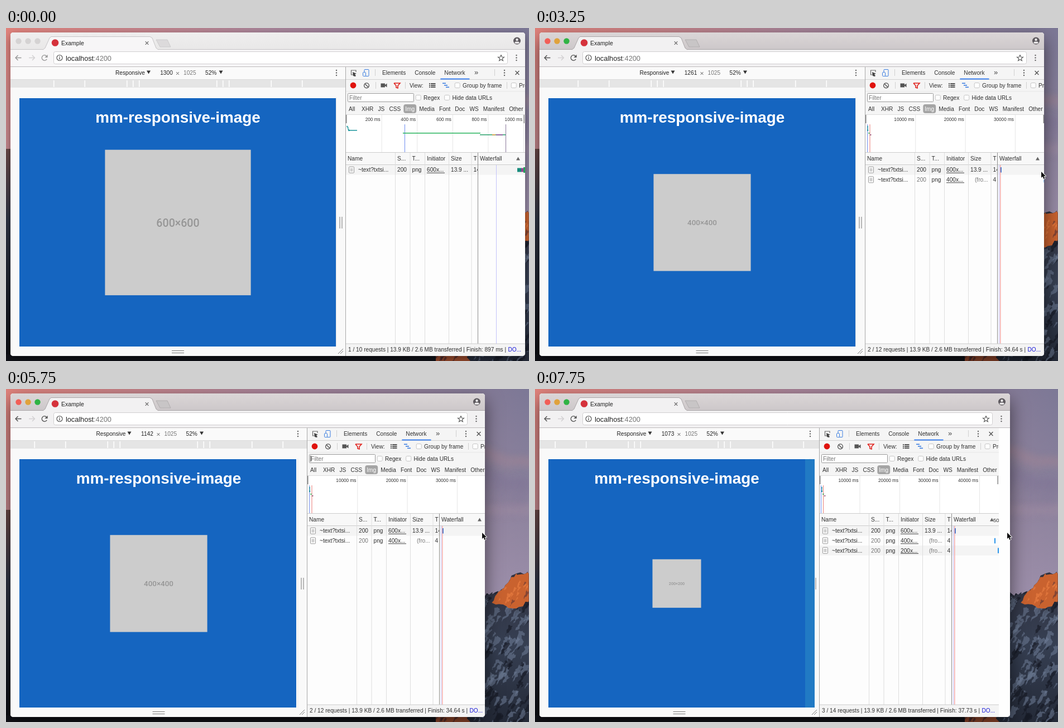
Write an HTML page with a canvas that moves like this. It is 937 px wide and 598 px high and loops after 8 s.

```html
<!DOCTYPE html>
<html lang="en">
<head>
<meta charset="utf-8">
<title>Responsive image demo</title>
<style>
html, body { margin: 0; width: 100%; height: 100%; overflow: hidden; background: #000; }
canvas { display: block; width: 937px; height: 598px; }
</style>
</head>
<body>
<canvas id="stage" width="937" height="598"></canvas>
<script>
const WIDE = 937, TALL = 598, LOOP = 8000, STEP = 250, TAU = Math.PI * 2;
const SCALE = 0.4354, PANEL = 321, TEXT = 10.15;
const SANS = '"Liberation Sans", Arial, sans-serif';
const INK = '#303030', GRAY = '#777', BLUE = '#3b7de0';
let ctx = document.getElementById('stage').getContext('2d');

// drag of the window edge: time, right edge, emulated viewport width
const DRAG = [
  { t: 2500, edge: 930, width: 1300 },
  { t: 3250, edge: 912, width: 1261 },
  { t: 3750, edge: 907, width: 1249 },
  { t: 4500, edge: 907, width: 1249 },
  { t: 4750, edge: 902, width: 1246 },
  { t: 5750, edge: 858, width: 1142 },
  { t: 6500, edge: 781, width: 984 },
  { t: 7000, edge: 773, width: 950 },
  { t: 7750, edge: 851, width: 1073 }
];
const NET = [
  { size: 600, requests: '1 / 10', finish: '897 ms', step: 63.6, unit: 200 },
  { size: 400, requests: '2 / 12', finish: '34.64 s', step: 89.3, unit: 10000 },
  { size: 200, requests: '3 / 14', finish: '37.73 s', step: 71.5, unit: 10000 }
];
// left edge of the text in each table column
const COLS = { 'Name': 3, 'S...': 92, 'T...': 118.5, 'Initiator': 145, 'Size': 188, 'T': 228.5, 'Waterfall': 240 };

function dragAt(t, field) {
  const i = DRAG.findIndex(k => k.t > t);
  if (i === 0) return DRAG[0][field];
  if (i < 0) return DRAG[DRAG.length - 1][field];
  const a = DRAG[i - 1], b = DRAG[i];
  return Math.round(a[field] + (b[field] - a[field]) * (t - a.t) / (b.t - a.t));
}

function rect(x, y, w, h, color) {
  ctx.fillStyle = color;
  ctx.fillRect(x, y, w, h);
}
function trace(points) {
  ctx.beginPath();
  points.forEach(p => ctx.lineTo(p[0], p[1]));
}
function poly(points, color) {
  trace(points);
  ctx.fillStyle = color;
  ctx.fill();
}
function stroke(points, color, width = 1) {
  trace(points);
  ctx.strokeStyle = color;
  ctx.lineWidth = width;
  ctx.stroke();
}
function dot(x, y, r, color) {
  ctx.beginPath();
  ctx.arc(x, y, r, 0, TAU);
  ctx.fillStyle = color;
  ctx.fill();
}
function arc(x, y, r, color, width = 1.2, from = 0, to = TAU) {
  ctx.beginPath();
  ctx.arc(x, y, r, from, to);
  ctx.strokeStyle = color;
  ctx.lineWidth = width;
  ctx.stroke();
}
function box(x, y, w, h, r, fill, edge) {
  ctx.beginPath();
  ctx.roundRect(x, y, w, h, r);
  if (fill) { ctx.fillStyle = fill; ctx.fill(); }
  if (edge) { ctx.strokeStyle = edge; ctx.lineWidth = 1; ctx.stroke(); }
}
// y is the middle of the capitals; returns the text width
function text(s, x, y, color = INK, size = TEXT, align = 'left', font = SANS, weight = '') {
  ctx.font = `${weight} ${size}px ${font}`;
  ctx.textAlign = align;
  ctx.fillStyle = color;
  ctx.fillText(s, x, y + size * 0.36);
  return ctx.measureText(s).width;
}
function flow(words, x, y, gap, chosen, mark) {
  for (const word of words) {
    ctx.font = `${TEXT}px ${SANS}`;
    if (word === chosen) mark(x, ctx.measureText(word).width);
    x += text(word, x, y, word === 'Img' ? '#fff' : INK) + gap;
  }
}
function clipped(x, y, w, h, r, paint) {
  ctx.save();
  ctx.beginPath();
  ctx.roundRect(x, y, w, h, r);
  ctx.clip();
  paint();
  ctx.restore();
}
function fade(x, y0, y1, ...colors) {
  const g = ctx.createLinearGradient(0, y0, x, y1);
  colors.forEach((c, i) => g.addColorStop(i / (colors.length - 1), c));
  return g;
}
const dots = (x, y) => [-4.5, 0, 4.5].forEach(d => dot(x, y + d, 1.2, '#666'));
const down = (x, y) => poly([[x - 3.5, y - 3], [x + 3.5, y - 3], [x, y + 3]], '#333');
const check = (x, y) => box(x - 4.5, y - 4.5, 9, 9, 2, '#fff', '#c4c4c4');
function cross(x, y, r, color, w) {
  stroke([[x - r, y - r], [x + r, y + r]], color, w);
  stroke([[x + r, y - r], [x - r, y + r]], color, w);
}

function makeWallpaper() {
  const page = document.createElement('canvas');
  page.width = WIDE;
  page.height = TALL;
  const main = ctx;
  ctx = page.getContext('2d');
  let seed = 11;
  const rnd = () => (seed = (seed * 16807) % 2147483647) / 2147483647;
  const spread = n => (rnd() - 0.5) * n;
  const jagged = (points, rough) => points.slice(1).flatMap((b, i) => {
    const a = points[i];
    return Array.from({ length: 7 }, (_, k) => [
      a[0] + (b[0] - a[0]) * k / 7 + spread(rough), a[1] + (b[1] - a[1]) * k / 7 + spread(rough)]);
  });
  const fleck = (x, y, n, color) =>
    poly(jagged([[x, y], [x + n * 0.5, y + n * 0.3], [x - n * 0.5, y + n * 1.4], [x, y]], n * 0.25), color);

  rect(0, 0, WIDE, TALL, fade(WIDE, 0, 0, '#e2837c', '#a9859a', '#7c7896'));
  rect(0, 0, WIDE, 400, fade(0, 0, 400, '#a391a800', '#a391a866', '#a394b0dd'));
  ctx.filter = 'blur(7px)';
  for (let x = 770; x < 950; x += 12) {
    const top = 122 - 20 * Math.exp(-(((x - 850) / 30) ** 2));
    fleck(x, top, 16, '#c3908f90');
    fleck(x, top + 36, 34, '#7d739460');
    fleck(x, 208, 16, '#b899a870');
  }
  ctx.filter = 'none';

  const slope = [[740, 290], [785, 320], [858, 369], [884, 364], [912, 332], [WIDE + 6, 330]];
  const ridge = jagged(slope, 5).concat([[WIDE, TALL], [740, TALL]]);
  poly(ridge, fade(0, 320, TALL, '#30313f', '#363f52', '#242a38'));
  ctx.save();
  trace(ridge);
  ctx.clip();
  for (let i = 0; i < 240; i++) {
    const x = 765 + rnd() * 180, y = 335 + rnd() * 265;
    const snowy = rnd() < 0.6 && y > 350 + (x - 780) * 0.25;
    fleck(x, y, 5 + rnd() * 17, snowy ? '#71809a88' : '#161923a0');
  }
  poly(jagged([[870, 384], [890, 358], [912, 332], [950, 330], [950, 370], [915, 395], [870, 384]], 5), '#c9622f');
  for (let i = 0; i < 24; i++) {
    fleck(880 + rnd() * 55, 340 + rnd() * 38, 3 + rnd() * 8, rnd() < 0.5 ? '#f0844690' : '#54303590');
  }
  poly(jagged([[740, TALL], [790, 555], [812, 564], [832, TALL]], 7).concat([[832, TALL]]), '#9c4c2e');
  for (let i = 0; i < 12; i++) fleck(770 + rnd() * 50, 565 + rnd() * 25, 9, '#38222a99');
  ctx.restore();

  rect(0, 217, 20, TALL, fade(0, 217, TALL, '#6b4a48', '#303646', '#1c202b', '#0a0b10'));
  rect(0, 586, 770, 12, '#111218');
  ctx = main;
  return page;
}

function drawChrome(W, active) {
  const ink = active ? '#555' : '#999', edge = active ? '#aaa6a8' : '#c6c4c6';
  const bar = active ? '#f2f1f2' : '#f7f6f7';
  rect(8, 8, W - 8, 31, active ? fade(0, 8, 38, '#dbd6d7', '#cdc8ca') : fade(0, 8, 38, '#efeeee', '#e9e8e8'));
  ['#f25e57', '#e0a23c', '#2fb344'].forEach((c, i) => dot(22.5 + i * 17, 23.5, 5.2, active ? c : '#d5d3d3'));
  rect(8, 38, W - 8, 31, bar);
  rect(8, 38, W - 8, 1, edge);
  const tab = [[66, 39], [70, 36], [78, 18], [81, 15.5], [258, 15.5], [262, 18], [269, 36], [273, 39]];
  poly(tab, bar);
  stroke(tab, edge);
  const plus = [[269, 21], [289, 21], [295, 34], [276, 34], [269, 21]];
  poly(plus, active ? '#c8c5c6' : '#dcdadb');
  stroke(plus, edge, 0.8);
  dot(88, 26.5, 6.3, '#d5323c');
  text('Example', 99, 27, '#222', 10.5);
  cross(252.5, 27, 2.8, '#666', 1.2);

  dot(W - 14.5, 23, 6.5, '#5d595e');
  dot(W - 14.5, 21, 2.2, '#e9e7e8');
  box(W - 18.5, 24.5, 8, 3.5, 2, '#e9e7e8');

  const arrow = (x, s, c) => {
    stroke([[x - 5 * s, 53.5], [x + 5 * s, 53.5]], c, 1.5);
    stroke([[x - s, 49], [x - 5.4 * s, 53.5], [x - s, 58]], c, 1.5);
  };
  arrow(22.5, 1, ink);
  arrow(46, -1, '#d2d0d2');
  arc(69, 53.5, 4.7, ink, 1.5, 0.5, 5.5);
  poly([[74.6, 47.7], [74.6, 53], [69.5, 53]], ink);
  box(85.5, 42.5, W - 117, 22, 3, '#fff', '#d0ced0');
  arc(96, 53.5, 5, '#555');
  rect(95.4, 52.5, 1.3, 4, '#555');
  rect(95.4, 50.3, 1.3, 1.3, '#555');
  const host = text('localhost', 107, 54, '#222', 12.7);
  text(':4200', 107 + host, 54, GRAY, 12.7);
  stroke(Array.from({ length: 11 }, (_, i) => {
    const r = i % 2 ? 2.5 : 5.8, a = i * TAU / 10 - TAU / 4;
    return [W - 43 + r * Math.cos(a), 54 + r * Math.sin(a)];
  }), '#555', 1.1);
  dots(W - 15.5, 53.5);
  rect(8, 69, W - 8, 1, '#bdbabc');
}

function drawDevice(P, W, width, net) {
  const left = 24, right = P - 339, mid = (left + right) / 2 + 0.5;
  rect(8, 70, P - 329, 23, '#fafafa');
  text('Responsive', mid - 112, 80, '#222');
  down(mid - 52.5, 79.5);
  text(width, mid - 20.5, 80, '#222', TEXT, 'center');
  cross(mid - 0.5, 81.5, 2.4, '#555', 1);
  text('1025', mid + 10, 80, GRAY);
  text('52%', mid + 49, 80, '#222');
  down(mid + 77, 79.5);
  dots(right + 1, 80.5);
  rect(8, 92, P - 329, 1, '#dadada');
  rect(8, 93, P - 329, 14, '#e5e5e5');
  for (const d of [69.5, 80.5, 91.5, 167, 222.5]) {
    rect(mid - d - 0.5, 94, 1.5, 12, '#fff');
    rect(mid + d - 0.5, 94, 1.5, 12, '#fff');
  }
  rect(8, 107, P - 329, 482, '#f9f9f9');
  rect(left, 125, right - left, 447, '#fff');
  rect(right, 125, 1, 447, '#e4e4e4');

  // the page lags behind the frame while the window changes size
  const growing = W > P + 3;
  const end = growing ? P - 347 : Math.min(right, W - 338);
  const center = growing ? (left + end) / 2 : mid, side = net.size * SCALE;
  rect(left, 126, end - left, 446, '#1565c0');
  text('mm-responsive-image', center, 160, '#fff', 27.87, 'center', SANS, 'bold');
  rect(center - side / 2, 349.3 - side / 2, side, side, '#ccc');
  text(net.size + '×' + net.size, center, 349.5, '#969696', 1 + net.size * 0.031, 'center', 'Roboto, sans-serif', '500');

  for (const d of [0, 4]) {
    rect(mid - 11, 579 + d, 22, 1, GRAY);
    rect(right + 6.5 + d, 339, 1, 21, GRAY);
    stroke([[right + 4 + d, 585], [right + 13, 576 + d]], GRAY);
  }
  if (growing) rect(end, 126, P - 330 - end, 446, '#217ac4');
}

// the panel is drawn from x = 0
function drawTools(caret) {
  const bar = (x, y) => rect(x, y, 1, 12, '#d0d0d0');
  rect(0, 70, PANEL, 85, '#f5f5f5');
  rect(0, 92, PANEL, 1, '#d2d2d2');
  rect(0, 113.5, PANEL, 0.7, '#e2e2e2');

  stroke([[13, 84], [9.5, 84], [9.5, 76], [18, 76], [18, 79]], '#666', 1.2);
  poly([[12, 79], [19, 82], [16, 83], [18, 86], [16.5, 87], [13, 86]], '#444');
  box(33, 74.5, 8, 12, 1, null, BLUE);
  box(30.5, 79.5, 5, 7, 1, '#f5f5f5', BLUE);
  bar(52, 74);
  flow(['Elements', 'Console', 'Network'], 65, 80, 16, 'Network', (x, w) => rect(x - 7, 90.5, w + 15, 2, '#3e82f0'));
  text('»', 230, 79, '#444', 13);
  bar(266, 74);
  dots(284, 80.5);
  cross(307, 80.5, 3.4, '#555', 1.4);

  dot(13, 103, 5.4, '#e0140f');
  arc(37, 103.3, 4.4, '#555', 1.4);
  stroke([[34, 100.3], [40, 106.3]], '#555', 1.4);
  rect(62.5, 99.5, 7.5, 7, '#555');
  poly([[69, 103], [73.5, 99.5], [73.5, 106.5]], '#555');
  stroke([[86, 99], [97, 99], [93, 103.5], [93, 108], [90, 107], [90, 103.5], [86, 99]], '#e0201b', 1.6);
  [53, 106, 288].forEach(x => bar(x, 97));
  text('View:', 114, 103);
  for (let i = 0; i < 3; i++) {
    rect(149, 99 + i * 3, 2, 2, '#555');
    rect(152, 99 + i * 3, 8.5, 2, '#555');
    rect(173 + i * 3, 98.5 + i * 3.5, 6, 1.6, BLUE);
  }
  const option = (s, x, y) => {
    check(x - 9.3, y);
    text(s, x, y);
  };
  option('Group by frame', 209, 103);
  option('Preserve log', 310, 103);
  box(3.5, 117.5, 118, 15, 1, '#fff', '#999');
  text('Filter', 6, 125, GRAY);
  if (caret) rect(5.5, 119.5, 1, 11, '#111');
  option('Regex', 139, 125);
  option('Hide data URLs', 190.5, 125);
  text('All', 5, 145);
  flow(['XHR', 'JS', 'CSS', 'Img', 'Media', 'Font', 'Doc', 'WS', 'Manifest', 'Other'], 28, 145, 8.1,
    'Img', (x, w) => box(x - 3, 137, w + 6, 16, 4, '#a5a5a5'));
}

function drawOverview(n) {
  const net = NET[n];
  rect(0, 155, PANEL, 69, '#fff');
  rect(0, 155, PANEL, 1, '#dcdcdc');
  for (let k = 1; k * net.step < PANEL; k++) {
    rect(k * net.step, 156, 1, 67, '#e6e6e6');
    text(k * net.unit + ' ms', k * net.step - 2, 164, '#333', 8.2, 'right');
  }
  rect(0, 156, 1.5, 15, '#888');
  rect(318.5, 156, 1.5, 15, '#888');

  // finished loads, scaled from the first time axis to the current one
  const zoom = n ? 0.02 : 1;
  const span = (x, y, w, c) => rect(x * zoom + (n ? 3 : 0), y, Math.max(2, w * zoom), 1.5, c);
  rect(n ? 4 - n : 105, 173, 1, 50, '#6f8df0');
  rect(n ? 9 - n * 1.5 : 286, 173, 1, 50, n ? '#ee7f78' : '#8c7a9c');
  for (let i = 0; i < 4; i++) span(1 + i, 176 + i * 2.5, 3, '#18959a');
  span(4, 183, 16, '#1a949c');
  span(102, 188, 139, '#27b35c');
  span(240, 191, 46, '#27a06a');
  span(262, 191, 6, '#e39a3a');
  span(269, 191, 12, '#93459c');
}

function drawTable(n, late) {
  const rowY = i => 254.7 + i * 17.6;
  const cell = (s, col, i, color) => text(s, COLS[col], rowY(i), color);
  rect(0, 223, PANEL, 344, '#fdfdfd');
  rect(0, 224, PANEL, 21, '#f8f8f8');
  rect(0, 223, PANEL, 1, '#ccc');
  rect(0, 245, PANEL, 1, '#ccc');
  for (let i = 0; i <= n; i += 2) rect(0, rowY(i) - 8.7, PANEL, 17.6, '#f4f4f4');
  for (const [name, x] of Object.entries(COLS)) {
    text(name, x, 234.5);
    if (x > 3) rect(x - 4, 224, 1, 343, name === 'Waterfall' ? '#8e8e8e' : '#dedede');
  }
  poly([[305, 237.5], [312, 237.5], [308.5, 231.5]], '#666');
  if (late) text('50000 ms', 311, 236, '#333', 9.5);

  for (let i = 0; i <= n; i++) {
    const y = rowY(i), dim = i ? GRAY : INK;
    box(5.5, y - 5.5, 9, 11, 1, '#fff', '#999');
    rect(7.5, y - 3, 5, 6, '#cfcfcf');
    text('~text?txtsi...', 22, y);
    cell('200', 'S...', i, dim);
    cell('png', 'T...', i);
    cell(NET[i].size + 'x...', 'Initiator', i);
    rect(145, y + 5, 32, 1, '#444');
    if (i) text('(fro...', 196, y, dim);
    else cell('13.9 ...', 'Size', i);
    clipped(224, y - 8, 12, 16, 0, () => cell(i ? '4 ms' : '143 ms', 'T', i));
    if (i) rect(n === 1 ? 319.5 : 307 + i * 6, y - 4.5, 2, 9.5, '#2a94ea');
  }
  if (n) {
    rect(239, 246, 1, 321, '#c3c3fa');
    rect(241, 246, 1.5, 321, '#f3aaaa');
    rect(242, 250, 1.7, 9.5, '#3665c4');
  } else {
    rect(269, 246, 1, 321, '#c3c3fa');
    rect(307, 251.5, 7, 7, '#168c7c');
    rect(314, 251.5, 4, 7, '#97418f');
    rect(318, 250, 3, 10, '#22a85a');
  }
  rect(0, 567, PANEL, 22, '#f4f4f4');
  rect(0, 566.5, PANEL, 1, '#ccc');
  text(`${NET[n].requests} requests | 13.9 KB / 2.6 MB transferred | Finish: ${NET[n].finish} |`, 4, 577.5);
  text('DO...', 290.5, 577.5, '#1a1ad8');
}

function drawPointer(x, y) {
  ctx.save();
  ctx.translate(x, y);
  ctx.lineJoin = 'round';
  const shape = [[0, 0], [0, 11], [2.5, 8.8], [4.4, 13], [6.4, 12.2], [4.6, 8.1], [8, 7.9], [0, 0]];
  stroke(shape, '#fff', 1.8);
  poly(shape, '#111');
  ctx.restore();
}

const wallpaper = makeWallpaper();

function draw(time) {
  const t = Math.floor(time / STEP) * STEP;
  const W = dragAt(t, 'edge'), width = dragAt(t, 'width');
  const P = Math.round(364 + SCALE * width), X = P - PANEL;
  const active = t >= 1750;
  const n = t < 3000 ? 0 : t < 6250 ? 1 : 2;
  const caret = active && t < 7250 && Math.floor((t - 1750) / 500) % 2 === 0;

  ctx.drawImage(wallpaper, 0, 0);
  ctx.save();
  ctx.shadowColor = active ? 'rgba(0,0,0,.55)' : 'rgba(0,0,0,.4)';
  ctx.shadowBlur = active ? 32 : 18;
  ctx.shadowOffsetY = active ? 12 : 6;
  box(8, 8, W - 8, 581, 5, '#fff');
  ctx.restore();

  clipped(8, 8, W - 8, 581, 5, () => {
    rect(8, 8, W - 8, 581, '#fefefe');
    drawChrome(W, active);
    clipped(8, 70, P - 8, 519, 0, () => {
      drawDevice(P, W, width, NET[n]);
      ctx.translate(X, 0);
      drawTools(caret);
      drawOverview(n);
      drawTable(n, W > P + 3);
      rect(-1, 70, 1, 519, '#a8a8a8');
    });
  });

  // the pointer swoops up from below, then holds the window edge
  const k = Math.min(1, (t - STEP) / 1000);
  if (k >= 0) drawPointer(W - 5 - 36 * Math.sin(Math.PI * k), 570 - 916 * k + 604 * k * k);
}

function tick() {
  draw(performance.now() % LOOP);
  requestAnimationFrame(tick);
}
tick();
</script>
</body>
</html>
```
